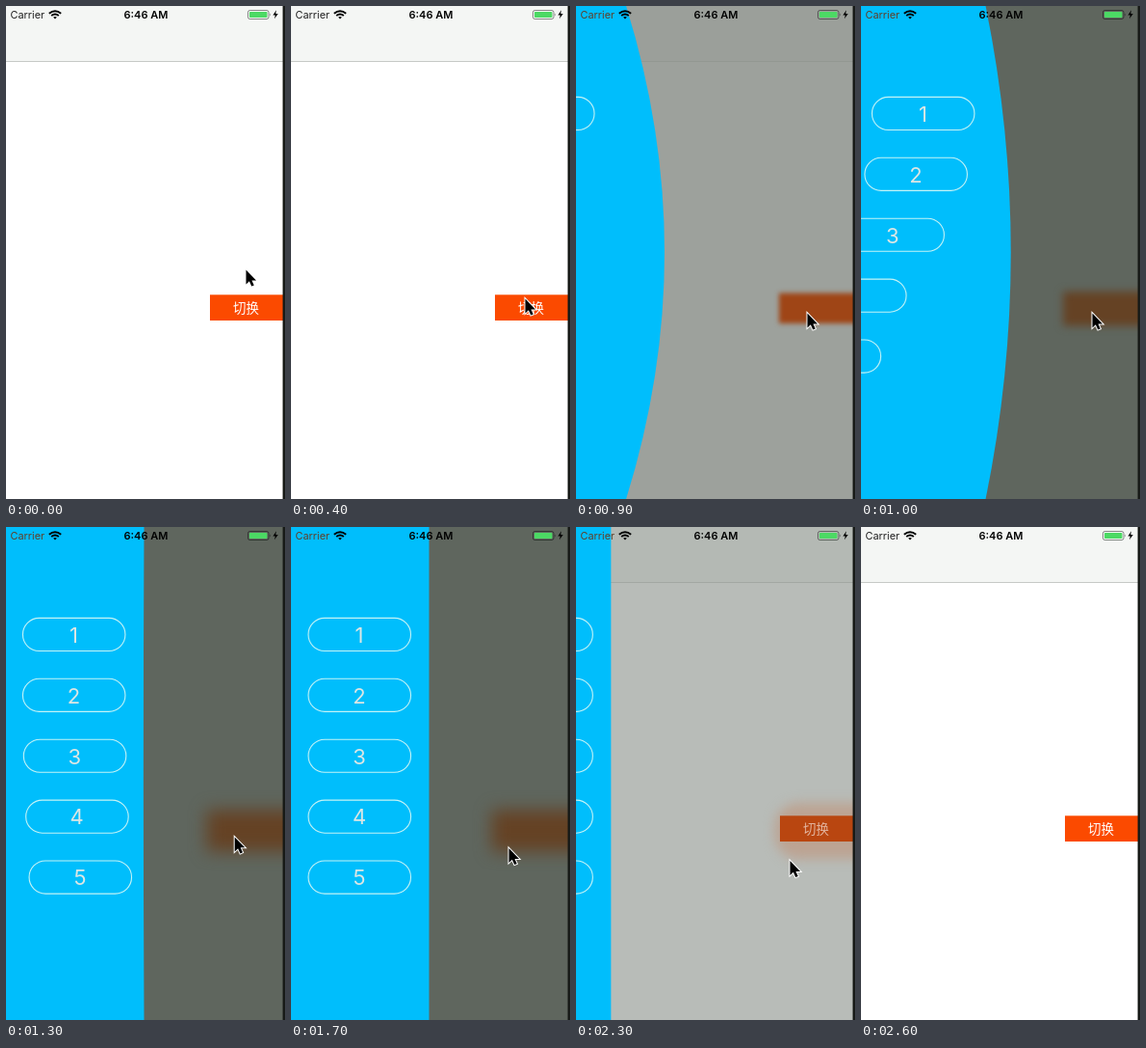
Animation, 290 px wide and 511 px high, one loop 3.1 s. Source, as an HTML page:

```html
<!DOCTYPE html>
<html lang="zh">
<head>
<meta charset="utf-8">
<title>Elastic side menu</title>
<style>
  html, body { margin: 0; width: 100%; height: 100%; overflow: hidden; background: #fff; }
  svg { display: block; width: 290px; height: 511px; }
  text { font-family: Inter, "Noto Sans", sans-serif; text-anchor: middle; }
  #label { font: 13.5px "Noto Sans CJK SC", "Noto Sans CJK", sans-serif; fill: #fff; }
  #menu rect { fill: none; stroke: #c4f3f6; stroke-width: 1.1; }
  #menu text { font-size: 22px; fill: #dce6e4; }
</style>
</head>
<body>
<svg viewBox="0 0 290 511">
  <defs>
    <filter id="soft" filterUnits="userSpaceOnUse" x="150" y="230" width="220" height="170" color-interpolation-filters="sRGB">
      <feGaussianBlur id="softDev" stdDeviation="0"/>
    </filter>
    <filter id="glow" filterUnits="userSpaceOnUse" x="150" y="230" width="220" height="170" color-interpolation-filters="sRGB">
      <feGaussianBlur id="glowDev" stdDeviation="0"/>
    </filter>
  </defs>

  <rect width="290" height="511" fill="#fff"/>
  <g id="nav">
    <rect width="290" height="57" fill="#f4f6f4"/>
    <rect y="57" width="290" height="1" fill="#c6c9c6"/>
  </g>
  <rect id="dim" width="290" height="511" fill="#5f665e"/>

  <rect id="halo" x="206.5" y="286" width="110" height="58" rx="25" filter="url(#glow)"/>
  <rect id="button"/>
  <text id="label" x="249.5" y="318">切换</text>

  <g id="menu">
    <path id="sheet" fill="#00befc"/>
  </g>

  <g id="status">
    <text id="carrier" x="22.3" y="13" font-size="10.9">Carrier</text>
    <path d="M44.8 7.8 Q51 2.6 57.2 7.8 M47.2 10.1 Q51 7 54.8 10.1" fill="none" stroke="#000" stroke-width="1.9"/>
    <path d="M49.1 11.6 Q51 10.2 52.9 11.6 L51 13.5Z"/>
    <text x="145.5" y="13" font-size="11" font-weight="600">6:46 AM</text>
    <rect x="251.5" y="4.5" width="21.5" height="9" rx="2" fill="none" stroke="#000" stroke-opacity=".45"/>
    <rect x="253" y="6" width="18.5" height="6" rx=".7" fill="#4cd964"/>
    <path d="M274 7.3 Q275.6 9 274 10.7Z" fill-opacity=".5"/>
    <path d="M281 4.3 L277.5 9.4 H279.9 L279 13.2 L282.8 8 H280.3Z"/>
  </g>

  <rect x="287.6" width="2.4" height="511" fill="#171a17"/>
  <path id="cursor" d="M0 0 V15 L3.4 11.8 L5.8 17 L8.3 15.9 L6 10.9 H10.6Z" stroke="#fff" stroke-width="2" paint-order="stroke"/>
</svg>

<script>
const LOOP = 3100, STEP = 100;
const OPEN = 0.751, CLOSE = 2.096;
const EDGE = 143.5, HIDDEN = -181;
const $ = id => document.getElementById(id);
const set = (el, attrs) => { for (const k in attrs) el.setAttribute(k, attrs[k]); };
const smooth = x => { x = Math.min(1, Math.max(0, x)); return x * x * (3 - 2 * x); };
const lerp = (a, b, p) => a + (b - a) * p;
const mix = (a, b, p) => `rgb(${a.map((v, i) => Math.round(lerp(v, b[i], p)))})`;

// Damped spring from 0 to 1
function spring(t, zeta, omega, v = 0) {
  if (t <= 0) return 0;
  const w = omega * Math.sqrt(1 - zeta * zeta), k = zeta * omega;
  return 1 - Math.exp(-k * t) * (Math.cos(w * t) + (k - v) / w * Math.sin(w * t));
}

// Linear track through [time, ...values] keys
function track(keys, t) {
  let i = 0;
  while (i < keys.length - 2 && t >= keys[i + 1][0]) i++;
  const [a, b] = [keys[i], keys[i + 1]];
  const p = Math.min(1, Math.max(0, (t - a[0]) / (b[0] - a[0])));
  return a.slice(1).map((v, j) => lerp(v, b[j + 1], p));
}

const cursorPath = [[0, 249.5, 273.5], [0.6, 240.5, 318.5], [1.2, 240.5, 318.5], [1.7, 226.5, 333],
  [2.2, 223, 343], [2.3, 222.5, 346], [2.4, 222, 350], [2.5, 136, 488]];
const dimIn = t => smooth((t - 0.765) / 0.235);
const dimOut = [[2, 1], [2.1, 0.98], [2.2, 0.8], [2.3, 0.44], [2.4, 0]];
const blurPath = [[0.8, 0], [0.9, 2.5], [1, 4.5], [1.2, 8.5], [2, 8.5], [2.1, 7], [2.2, 2], [2.3, 0]];
const labelPath = [[0.6, 1], [0.7, 0.2], [0.8, 0.2], [0.9, 0], [2.1, 0], [2.2, 0.12], [2.3, 0.6], [2.4, 1]];

const items = [1, 2, 3, 4, 5].map((n, i) => {
  const g = document.createElementNS("http://www.w3.org/2000/svg", "g");
  const y = 94.4 + 62.9 * i;
  g.innerHTML = `<rect x="18" y="${y}" width="106.5" height="34.1" rx="17"/><text x="71" y="${y + 25.3}">${n}</text>`;
  $("menu").append(g);
  return g;
});

function drawMenu(t) {
  const shift = t < CLOSE ? HIDDEN * (1 - smooth((t - OPEN) / 0.3)) : -EDGE * smooth((t - CLOSE) / 0.304);
  const s = t - 0.79;
  const bulge = t < 1.7 ? 187 * (spring(s, 0.5, 19.7, 0.9) - spring(s, 0.8, 12.3, 2)) : 0;
  const x = EDGE + shift;
  set($("sheet"), { d: `M-300 0 H${x} Q${x + bulge} 255.5 ${x} 511 H-300Z` });
  items.forEach((g, i) => {
    const lag = 90 * (1 - spring(t - 0.76 - 0.06 * i, 0.62, 15.8));
    set(g, { transform: `translate(${shift - lag} 0)` });
  });
  set($("carrier"), { fill: x > 20 ? "#60402a" : "#222" });
}

function drawPage(t) {
  const dim = t < 2 ? dimIn(t) : track(dimOut, t)[0];
  const blur = track(blurPath, t)[0];
  set($("nav"), { opacity: Math.max(0, 1 - (dim / 0.8) ** 2) });
  set($("dim"), { opacity: dim });
  set($("button"), {
    x: 212 - 0.4 * blur, y: 299.3 - 0.7 * blur, width: 120, height: 26.7 + 1.9 * blur,
    fill: mix([251, 74, 0], [101, 66, 36], dim),
    filter: blur > 0.1 ? "url(#soft)" : "none"
  });
  set($("softDev"), { stdDeviation: blur });
  set($("label"), { opacity: track(labelPath, t)[0] });

  const closing = t > 2.15 && t < 2.35, late = t > 2.25;
  set($("halo"), { visibility: closing ? "visible" : "hidden", fill: late ? "#bca392" : "#5f665e" });
  set($("glowDev"), { stdDeviation: late ? 6 : 0.3 });
}

function drawCursor(t) {
  const [x, y] = track(cursorPath, t);
  set($("cursor"), { transform: `translate(${x} ${y})`, visibility: t < 2.55 ? "visible" : "hidden" });
}

const start = performance.now();
function frame(now) {
  const ms = Math.max(0, now - start) % LOOP;
  const t = Math.floor(ms / STEP) * STEP / 1000;
  drawPage(t);
  drawMenu(t);
  drawCursor(t);
  requestAnimationFrame(frame);
}
frame(start);
</script>
</body>
</html>
```
